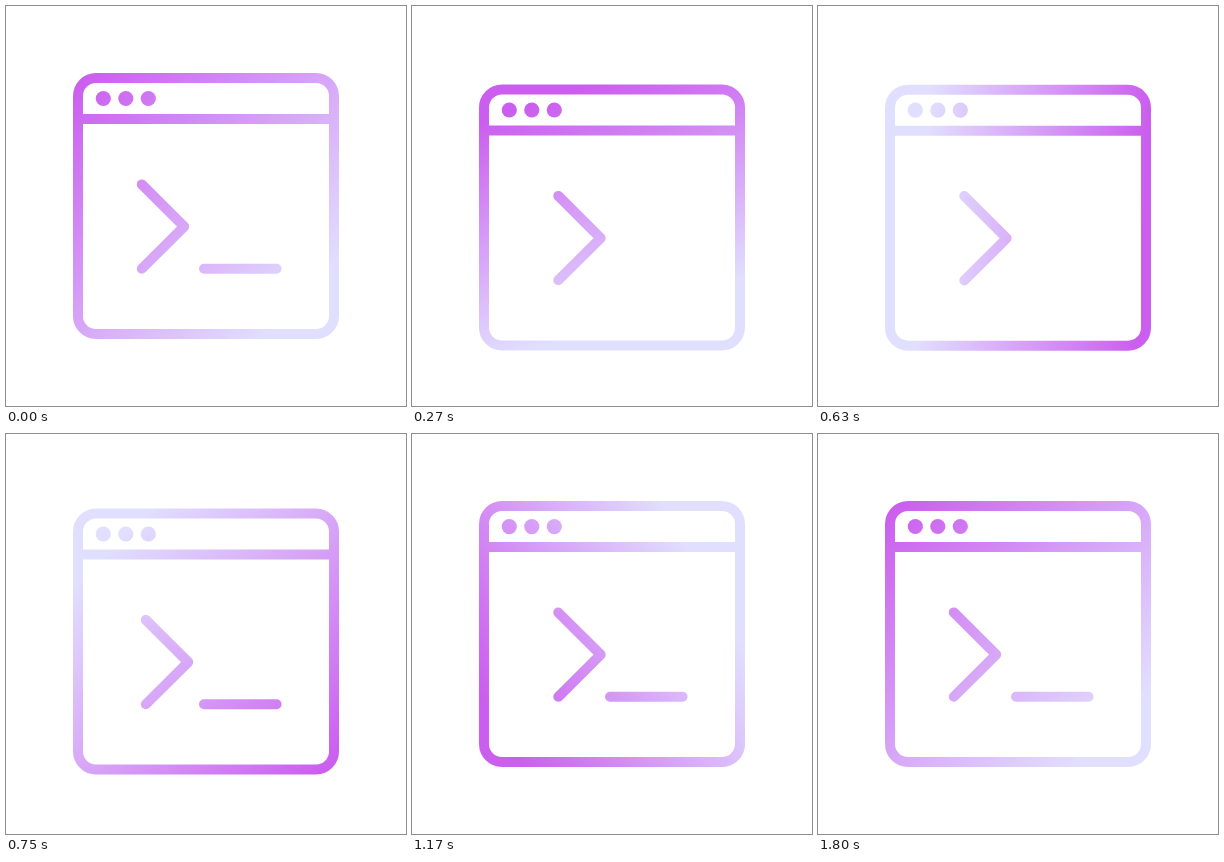
An HTML page for the animation above (3830 ms loop, 400x400 px).

```html
<!DOCTYPE html>
<html lang="en">
<head>
<meta charset="utf-8">
<title>Terminal window</title>
<style>
  html, body { margin: 0; width: 100%; height: 100%; overflow: hidden; background: #fff; }
  svg { display: block; width: 100%; height: 100%; }
</style>
</head>
<body>
<svg viewBox="0 0 400 400">
  <defs>
    <linearGradient id="tint" gradientUnits="userSpaceOnUse">
      <stop offset="0" stop-color="#cb5eee"/>
      <stop offset="1" stop-color="#e1dfff"/>
    </linearGradient>
  </defs>
  <g id="window" fill="none" stroke="url(#tint)" stroke-width="10" stroke-linecap="round" stroke-linejoin="round">
    <rect x="72" y="72" width="256" height="256" rx="18"/>
    <path d="M72 113H328" stroke-linecap="butt"/>
    <g fill="url(#tint)" stroke="none">
      <circle cx="97.3" cy="92.5" r="7.6"/>
      <circle cx="119.8" cy="92.5" r="7.6"/>
      <circle cx="142.3" cy="92.5" r="7.6"/>
    </g>
    <path id="prompt" d="M135.8 178.4L178.2 220.6L135.8 262.8"/>
    <!-- A hairline slope keeps the bounding box non-empty. -->
    <path id="cursor" d="M198 262.7L270.6 262.71"/>
  </g>
</svg>
<script>
  const LOOP = 3830, ACTIVE = 1800, STEP = 30;
  const byId = id => document.getElementById(id);
  const tint = byId('tint'), win = byId('window'), prompt_ = byId('prompt'), cursor = byId('cursor');

  // [time, value]
  const drop = [[0, 0], [270, 11.5], [420, 16], [480, 15.6], [750, 7.5], [960, 1.5], [1110, 0.3], [1200, 0]];
  // Dark end of the gradient, counted in sides travelled around the window
  const turn = [[0, 0], [270, 0.33], [480, 0.93], [750, 2], [1170, 3.22], [1500, 3.85], [1635, 4]];
  const corners = [[-1, -1], [1, -1], [1, 1], [-1, 1]];

  // Monotone cubic interpolation
  function curve(keys) {
    const slope = keys.slice(1).map(([t, v], i) => (v - keys[i][1]) / (t - keys[i][0]));
    const tangent = keys.map((_, i) => {
      const a = slope[i - 1], b = slope[i];
      return a * b > 0 ? 2 * a * b / (a + b) : 0;
    });
    return time => {
      const i = keys.findIndex(([t]) => t > time) - 1;
      if (i < 0) return keys[keys.length - 1][1];
      const [t0, v0] = keys[i], [t1, v1] = keys[i + 1];
      const h = t1 - t0, s = (time - t0) / h, r = 1 - s;
      return r * r * (1 + 2 * s) * v0 + s * s * (3 - 2 * s) * v1
        + h * s * r * (r * tangent[i] - s * tangent[i + 1]);
    };
  }
  const dropAt = curve(drop), turnAt = curve(turn);

  function setTint(sides) {
    const side = Math.floor(sides), part = sides - side;
    const from = corners[side % 4], to = corners[(side + 1) % 4];
    ['x', 'y'].forEach((axis, k) => {
      const q = from[k] + (to[k] - from[k]) * part;
      tint.setAttribute(axis + 1, 200 + 125 * q);
      tint.setAttribute(axis + 2, 200 - 95 * q);
    });
  }

  function draw(now) {
    const t = Math.min(Math.floor((now % LOOP) / STEP) * STEP, ACTIVE);
    const shift = 8 * (1 - Math.cos(2 * Math.PI * t / 900));
    const hidden = t < 1440 && Math.floor(t / 180) % 2 === 1;
    win.setAttribute('transform', `translate(0 ${dropAt(t)})`);
    prompt_.setAttribute('transform', `translate(${shift} 0)`);
    cursor.setAttribute('visibility', hidden ? 'hidden' : 'visible');
    setTint(turnAt(t));
  }

  const start = performance.now();
  function tick() {
    draw(performance.now() - start);
    requestAnimationFrame(tick);
  }
  tick();
</script>
</body>
</html>
```
